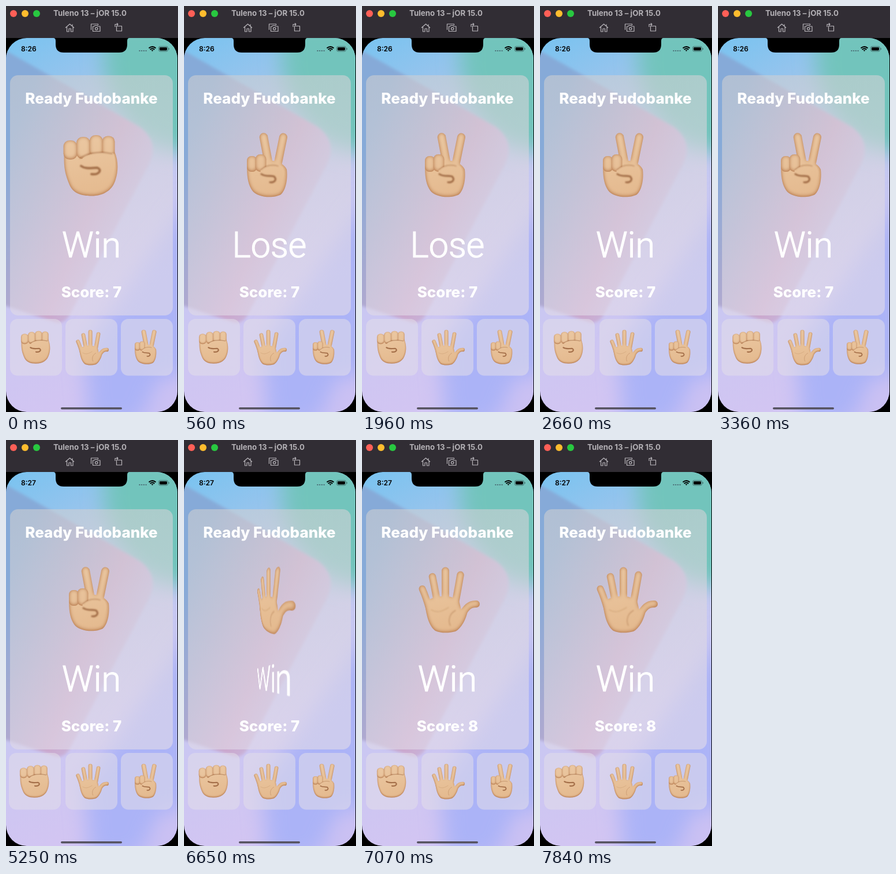
Recreate the animation shown at these times as an HTML page. Size 298 by 698 pixels, loop 8 s.

```html
<!DOCTYPE html>
<html lang="en">
<head>
<meta charset="utf-8">
<title>Hand game</title>
<style>
  html, body { margin: 0; width: 100%; height: 100%; overflow: hidden; background: #000; }
  #stage { position: relative; width: 298px; height: 698px; overflow: hidden; }
  svg { position: absolute; display: block; }
  text { font-family: Inter, "Open Sans", sans-serif; }
  .heading { font-size: 26px; font-weight: 850; fill: #fff; text-anchor: middle; }
  #word text { font: 300 61px Roboto, sans-serif; fill: #fff; stroke: #fff; stroke-width: 1.2px; text-anchor: middle; }
  #hand { left: 88px; top: 210px; }
  #word { left: 78px; top: 371px; }
  .flip { transform-origin: 50% 50%; }
</style>
</head>
<body>
<div id="stage">
  <svg width="298" height="698" viewBox="0 0 298 698">
    <defs>
      <linearGradient id="base" x1="0" y1="0" x2=".25" y2="1">
        <stop offset="0" stop-color="#78c3f0"/><stop offset=".25" stop-color="#9fc4ec"/>
        <stop offset=".55" stop-color="#c6c8f2"/><stop offset="1" stop-color="#d2c5f2"/>
      </linearGradient>
      <linearGradient id="wedge" gradientUnits="userSpaceOnUse" x1="0" y1="250" x2="235" y2="345">
        <stop offset="0" stop-color="#86aad8"/><stop offset=".35" stop-color="#a9a9d0"/>
        <stop offset=".68" stop-color="#cba8cd"/><stop offset="1" stop-color="#c5bde5"/>
      </linearGradient>
      <linearGradient id="panel" x1="0" y1="0" x2=".3" y2="1">
        <stop offset="0" stop-color="#cfcfd0" stop-opacity=".58"/>
        <stop offset="1" stop-color="#e2dbe8" stop-opacity=".6"/>
      </linearGradient>
      <linearGradient id="skin" gradientUnits="userSpaceOnUse" x1="135" y1="218" x2="158" y2="330">
        <stop offset="0" stop-color="#ebc8a2"/><stop offset="1" stop-color="#e4b98e"/>
      </linearGradient>
      <filter id="soft" x="-40%" y="-40%" width="180%" height="180%"><feGaussianBlur stdDeviation="18"/></filter>
      <filter id="faint"><feGaussianBlur stdDeviation="2.500"/></filter>
      <filter id="smudge" x="-50%" y="-50%" width="200%" height="200%"><feGaussianBlur stdDeviation="1.100"/></filter>
      <filter id="puffy" x="-10%" y="-10%" width="120%" height="120%" color-interpolation-filters="sRGB">
        <feGaussianBlur in="SourceAlpha" stdDeviation="3"/>
        <feOffset dx="-.5" dy="-1.500" result="core"/>
        <feFlood flood-color="#a9673a" flood-opacity=".95"/>
        <feComposite in2="core" operator="out"/>
        <feComposite in2="SourceGraphic" operator="atop"/>
      </filter>
      <clipPath id="screen"><rect y="55" width="297" height="643" rx="36"/></clipPath>
    </defs>

    <rect width="298" height="698"/>
    <g clip-path="url(#screen)">
      <rect y="55" width="298" height="643" fill="url(#base)"/>
      <g filter="url(#soft)">
        <path d="M170 20H340V250Q260 260 215 205T170 100Z" fill="#72c4bc"/>
        <path d="M320 330V640H270L230 720H145L135 590L240 440Z" fill="#abb3f7"/>
        <path d="M320 630L225 720H320Z" fill="#c9c0f3"/>
      </g>
      <path d="M-5 74L232 208Q268 235 246 276L112 528Q101 549 84 543L-5 514Z" fill="url(#wedge)" filter="url(#faint)"/>
    </g>

    <rect width="298" height="55" fill="#312d34"/>
    <g id="lights"></g>
    <text x="82" y="17" font-size="13.300" font-weight="700" fill="#b3b0b5">Tuleno 13 – jOR 15.0</text>
    <g fill="none" stroke="#b9b6bb" stroke-width="1.2" stroke-linejoin="round">
      <path d="M103 37.5L110.500 31L118 37.500M105.500 36V44H109V39H112.500V44H116V36M115 34V31.500"/>
      <path d="M147.500 41V31H159.500V33M150.500 35H153L154 33.500H158L159 35H163V43.500H150.500Z"/>
      <circle cx="156.700" cy="39" r="2.200"/>
      <path d="M191.500 34.500H200.500V43H191.500ZM189 36V31.500H194M192 29.500L194 31.500L192 33.500"/>
    </g>

    <path d="M82 55Q86 55 86 60V66Q86 80 100 80H196Q210 80 210 66V60Q210 55 214 55Z"/>
    <text id="clock" x="26" y="78" font-size="12" font-weight="600"></text>
    <path d="M230.500 77H244" stroke="#4c6f77" stroke-width="2" stroke-dasharray="2 1.700"/>
    <g fill="none" stroke="#000" stroke-width="1.900">
      <path d="M247.500 72.500Q253.500 67.300 259.500 72.500M249.700 74.900Q253.500 71.700 257.300 74.900"/>
      <path d="M251.700 76.200Q253.500 74.800 255.300 76.200L253.500 78Z" fill="#000" stroke="none"/>
      <rect x="264.500" y="69.500" width="16" height="8.500" rx="2.600" stroke="#45706f" stroke-width="1"/>
      <rect x="266" y="71" width="13" height="5.500" rx="1.400" fill="#000" stroke="none"/>
      <path d="M282.300 72.300V75.300" stroke="#45706f" stroke-width="1.200"/>
    </g>

    <rect x="7" y="119" width="282" height="413" rx="14" fill="url(#panel)"/>
    <text class="heading" x="148" y="168">Ready Fudobanke</text>
    <text class="heading" id="score" x="148" y="501"></text>
    <g id="buttons"></g>
    <rect x="95" y="690" width="106" height="3.500" rx="1.700" fill="#55525f"/>
  </svg>
  <svg id="hand" class="flip" width="120" height="130" viewBox="88 210 120 130"></svg>
  <svg id="word" class="flip" width="140" height="80" viewBox="78 371 140 80"><text x="148" y="432"></text></svg>
</div>
<script>
const $ = id => document.getElementById(id);

// A skin-coloured piece whose rim is softly shaded.
const puffy = shapes => `<g filter="url(#puffy)" fill="url(#skin)" stroke-linecap="round">${shapes}</g>`;
const knuckle = (x, y, w, h) => puffy(`<rect x="${x}" y="${y}" width="${w}" height="${h}" rx="${w * .44}"/>`);
const finger = (d, w) => `<path d="${d}" fill="none" stroke="url(#skin)" stroke-width="${w}"/>`;
const area = d => `<path d="${d}"/>`;
const crease = (d, w, opacity = .75) =>
  `<path d="${d}" fill="none" stroke="#8f5630" stroke-opacity="${opacity}" stroke-width="${w}" stroke-linecap="round" filter="url(#smudge)"/>`;

const hands = {
  rock:
    puffy(area('M101 250C99 280 104 292 109 305C115 322 130 326 146 326.500C170 327 185 316 190 298C194.500 284 195 266 188 250Z')) +
    knuckle(99.5, 231, 24, 33) + knuckle(122, 225, 24, 38) + knuckle(144.5, 222, 23.5, 37) + knuckle(166.5, 223.500, 22, 36) +
    area('M128 274C126 258 150 249 186 253C192 268 190 294 172 301C150 304 168 285 158 279C145 281 132 281 128 274Z')
      .replace('/>', ' fill="url(#skin)"/>') +
    crease('M128 262C140 253 160 249 184 254', 2, .45) +
    crease('M130 275C138 281 148 278 158 278C168 282 160 291 148 289', 4),
  paper:
    puffy(
      finger('M104.500 256Q111 270 117 292', 12) + finger('M122 235Q127 258 131 284', 12.5) +
      finger('M144.500 225V282', 13) + finger('M170.500 232Q166 258 161 284', 12.5) +
      finger('M198 282C184 281 180 290 164 312', 12) +
      area('M109 280C122 266 154 265 168 276L172 292L184 290C181 308 172 324 162 329C149 332.500 136 332 127 328C116 320 111 301 109 280Z')) +
    crease('M162 293C151 299 149 310 153 319', 1.5, .35) +
    crease('M120 292C132 299 141 293 150 288', 1.2, .25),
  scissors:
    puffy(finger('M138 225.500Q142 247 149 284', 14.5) + finger('M172 225.500Q167 250 160 284', 14) +
      area('M109.500 268C108 292 111 307 118 317C127 330 156 331 168 324C177 316 180 296 178 281C174 272 162 264 142 266Z')) +
    knuckle(109, 258, 17.5, 27) + knuckle(123.5, 255, 19, 30) +
    area('M132 284C138 275 158 269 170 276C178 286 172 306 158 304C152 294 143 293 132 284Z')
      .replace('/>', ' fill="url(#skin)"/>') +
    crease('M134 281C142 274 152 272 163 275', 1.8, .4) +
    crease('M134 289C142 294 149 291 156 293C162 299 156 304 149 303', 3.2)
};

['#ff5f57', '#febc2e', '#28c840'].forEach((color, i) => {
  $('lights').innerHTML += `<circle cx="${13 + 20 * i}" cy="13" r="6" fill="${color}"/>`;
});
$('buttons').innerHTML = Object.keys(hands).map((name, i) => `<g>
  <rect x="${7 + 96 * i}" y="538" width="90" height="97.500" rx="13" fill="#e2deea" fill-opacity=".55"/>
  <g transform="translate(${-27.5 + 96 * i} 439.500) scale(.537)">${hands[name]}</g></g>`).join('');

const LOOP = 8000, STEP = 70, LAST = 7840, SPIN = 350;
const rounds = [
  { at: -SPIN, hand: 'rock', word: 'Win' },
  { at: 119, hand: 'scissors', word: 'Lose' },
  { at: 2289, hand: 'scissors', word: 'Win' },
  { at: 6559, hand: 'paper', word: 'Win' }
];
const shakes = [2310, 4900];
const easeInOut = u => (1 - Math.cos(Math.PI * Math.min(1, u))) / 2;

function shakeAt(t) {
  const start = shakes.filter(s => s <= t).pop();
  const age = (t - start) / 1000;
  return age < 2.2 ? -3 * Math.exp(-1.2 * age) * Math.cos(2 * Math.PI * age / .35) : 0;
}

let shown;
function render(t) {
  const round = rounds.filter(r => r.at <= t).pop();
  if (round !== shown) {
    $('hand').innerHTML = hands[round.hand];
    $('word').firstElementChild.textContent = round.word;
    shown = round;
  }
  const angle = -360 * easeInOut((t - round.at) / SPIN);
  const turn = angle > -360 ? `perspective(145px) rotateY(${angle}deg)` : 'none';
  $('hand').style.transform = $('word').style.transform = turn;
  $('buttons').firstElementChild.setAttribute('transform', `translate(${shakeAt(t)} 0)`);
  $('clock').textContent = t < 4620 ? '8:26' : '8:27';
  $('score').textContent = `Score: ${t < 6720 ? 7 : 8}`;
}

const origin = performance.now();
function tick() {
  const t = (performance.now() - origin) % LOOP;
  render(Math.min(LAST, Math.floor(t / STEP) * STEP));
  requestAnimationFrame(tick);
}
tick();
</script>
</body>
</html>
```
